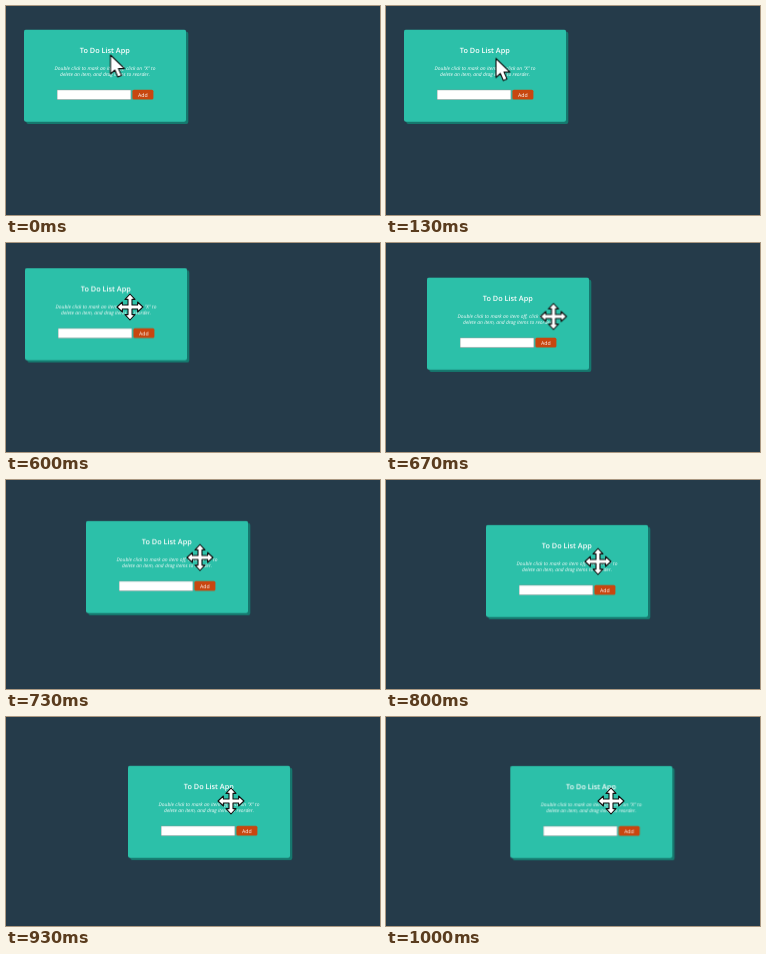
An HTML page for the animation above (1140 ms loop, 374 by 209 pixels).

```html
<!DOCTYPE html>
<html lang="en">
<head>
<meta charset="utf-8">
<title>Dragging a to do list</title>
<style>
  html, body { margin: 0; width: 100%; height: 100%; overflow: hidden; background: #253b4a; }
  svg { display: block; width: 100vw; height: 100vh; }
  text {
    font-family: "Open Sans", "Noto Sans", sans-serif;
    fill: #fff;
    text-anchor: middle;
    text-rendering: geometricPrecision;
  }
  .title { font-size: 7.3px; font-weight: 600; }
  .hint { font-size: 4.93px; font-style: italic; }
  .label { font-size: 5.2px; }
  .pointer path { fill: #fff; stroke: #111; stroke-width: 1.1; stroke-linejoin: round; }

  .card, .pointer, .arrow, .move { animation: 1140ms step-end infinite; }
  .card { animation-name: drag; }
  .pointer { animation-name: point; }
  .arrow { animation-name: arrow; }
  .move { animation-name: move; }

  @keyframes drag {
    0% { transform: translate(18px, 23.5px); }
    52.63% { transform: translate(19px, 25px); }
    58.77% { transform: translate(41px, 34.4px); }
    64.03% { transform: translate(80px, 40.8px); }
    70.17% { transform: translate(100px, 44.8px); }
    76.31% { transform: translate(116px, 48px); }
    81.57% { transform: translate(122px, 48.6px); }
    87.71%, 100% { transform: translate(124.3px, 48.8px); }
  }
  @keyframes point {
    0% { transform: translate(104.5px, 49px); }
    6.14% { transform: translate(107px, 50.5px); }
    11.4% { transform: translate(110px, 52.5px); }
    17.54% { transform: translate(113px, 54.5px); }
    23.68% { transform: translate(116px, 56.5px); }
    28.94% { transform: translate(118.5px, 58.5px); }
    52.63% { transform: translate(124px, 64px); }
    58.77% { transform: translate(167.5px, 73.5px); }
    64.03% { transform: translate(194px, 77.5px); }
    70.17% { transform: translate(212px, 81.5px); }
    76.31% { transform: translate(224px, 84px); }
    81.57%, 100% { transform: translate(225px, 84px); }
  }
  @keyframes arrow {
    0% { opacity: 1; }
    23.68%, 100% { opacity: 0; }
  }
  @keyframes move {
    0% { opacity: 0; }
    23.68%, 100% { opacity: 1; }
  }
</style>
</head>
<body>
<svg viewBox="0 0 374 209">
  <defs>
    <filter id="soft" x="-5%" y="-5%" width="110%" height="110%">
      <feGaussianBlur stdDeviation=".6"/>
    </filter>
  </defs>

  <g class="card">
    <rect x="2.3" y="2.3" width="162" height="92.3" rx="2" fill="#16786e" filter="url(#soft)"/>
    <rect width="162" height="92.3" rx="2" fill="#2cc0a9"/>
    <text class="title" x="80.8" y="23.5">To Do List App</text>
    <text class="hint" x="81" y="40.2">Double click to mark an item off, click on "X" to</text>
    <text class="hint" x="81" y="46.6">delete an item, and drag items to reorder.</text>

    <rect x="33" y="60.2" width="74.3" height="10.2" fill="#7d9a96"/>
    <rect x="33.4" y="60.7" width="73.2" height="9.1" fill="#fff"/>

    <rect x="108.4" y="60.2" width="21" height="9.9" rx="1.5" fill="#c8460f"/>
    <text class="label" x="118.8" y="67.2">Add</text>
  </g>

  <g class="pointer">
    <path class="arrow" d="M0 0V19L4.4 15 7.3 22 11 20.4 8 13.6H14Z"/>
    <path class="move" d="M0-13L5-7.6H2V-2H7.6V-5L13 0 7.6 5V2H2V7.6H5L0 13-5 7.6H-2V2H-7.6V5L-13 0-7.6-5V-2H-2V-7.6H-5Z"/>
  </g>
</svg>
</body>
</html>
```
